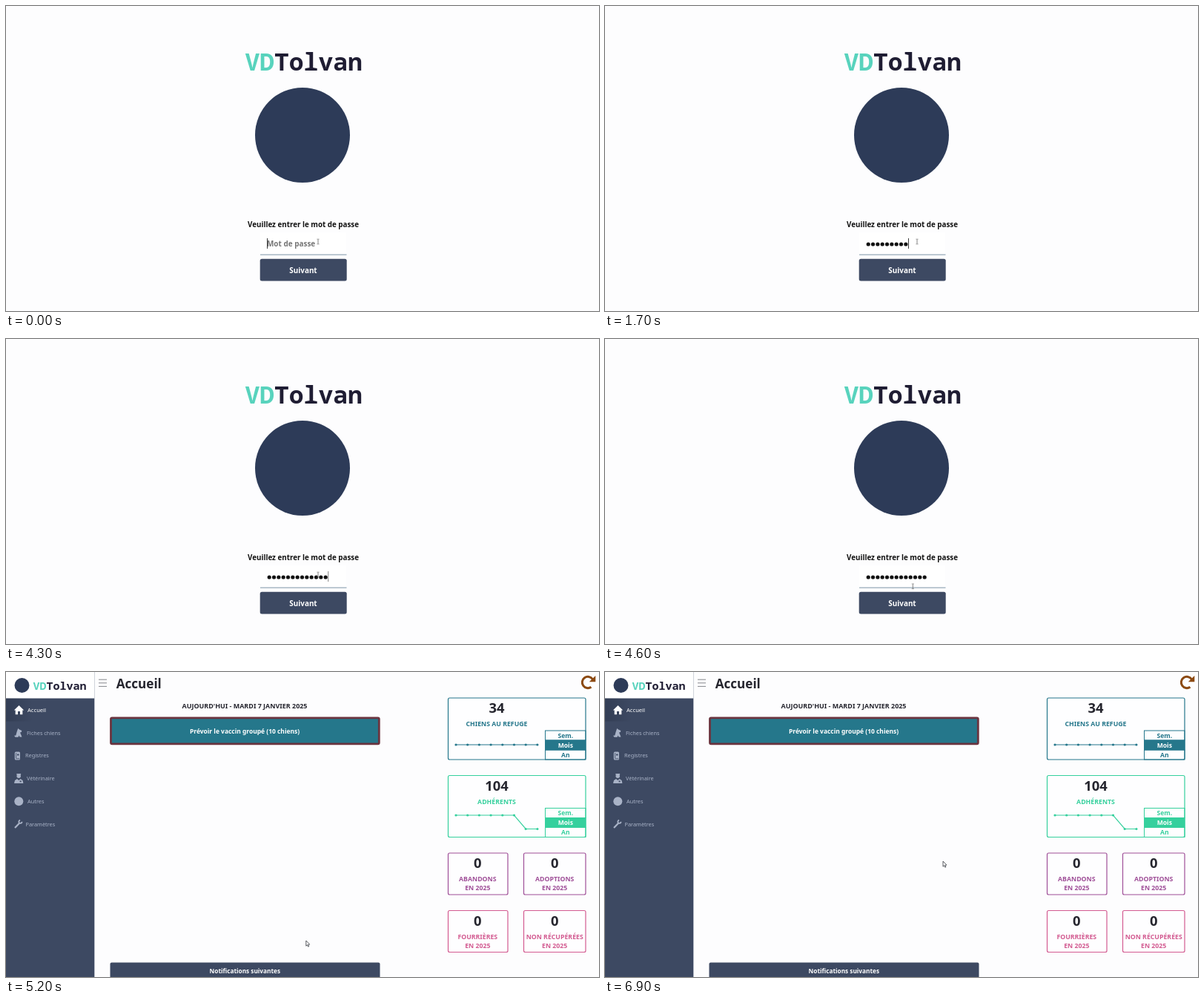
An HTML page with a canvas that plays this animation: 800 px wide and 411 px high, repeating every 7000 ms.

```html
<!DOCTYPE html>
<html lang="fr">
<head>
<meta charset="utf-8">
<title>Refuge</title>
<style>
html, body { margin: 0; width: 100%; height: 100%; overflow: hidden; background: #fdfdfe; }
canvas { display: block; width: 800px; height: 411px; }
</style>
</head>
<body>
<canvas id="stage"></canvas>
<script>
const W = 800, H = 411, LOOP = 7000;
const canvas = document.getElementById('stage');
const ctx = canvas.getContext('2d');
const ratio = window.devicePixelRatio || 1;
canvas.width = W * ratio;
canvas.height = H * ratio;

const SANS = '"Noto Sans", "Open Sans", sans-serif';
const MONO = '"Noto Sans Mono", "DejaVu Sans Mono", monospace';
const NAVY = '#3d4962', INK = '#25252e', PAPER = '#fdfdfe', LOGO = '#2d3b58';
const TEAL = '#25778b', GREEN = '#35d09d', PURPLE = '#9f4f98', PINK = '#d35b91';
const KEY_TIMES = [600, 700, 800, 900, 1000, 1200, 1400, 1600, 1700, 1900, 2100, 2300, 2500];

const clamp = v => Math.max(0, Math.min(1, v));
const progress = (t, from, to) => clamp((t - from) / (to - from));
const ease = p => p * p * (3 - 2 * p);
const lerp = (a, b, p) => a + (b - a) * p;

function text(str, x, y, size, color, align = 'center', weight = 'bold', family = SANS) {
  ctx.font = `${weight} ${size}px ${family}`;
  ctx.textAlign = align;
  ctx.fillStyle = color;
  ctx.fillText(str, x, y);
}

function rect(x, y, w, h, color) {
  ctx.fillStyle = color;
  ctx.fillRect(x, y, w, h);
}

function round(x, y, w, h, r) {
  ctx.beginPath();
  ctx.roundRect(x, y, w, h, r);
}

function disc(x, y, r, color) {
  ctx.fillStyle = color;
  ctx.beginPath();
  ctx.arc(x, y, r, 0, Math.PI * 2);
  ctx.fill();
}

function line(points, color, width) {
  ctx.strokeStyle = color;
  ctx.lineWidth = width;
  ctx.beginPath();
  points.forEach(([x, y]) => ctx.lineTo(x, y));
  ctx.stroke();
}

function poly(points, color) {
  ctx.fillStyle = color;
  ctx.beginPath();
  points.forEach(([x, y]) => ctx.lineTo(x, y));
  ctx.fill();
}

function brand(x, y, size) {
  text('VD', x, y, size, '#58d3bd', 'left', 'bold', MONO);
  const w = ctx.measureText('VD').width;
  text('Tolvan', x + w, y, size, '#1f1d33', 'left', 'bold', MONO);
}

function arrow(x, y) {
  ctx.beginPath();
  [[0, 0], [0, 7.2], [1.6, 5.8], [2.8, 8.2], [3.9, 7.7], [2.8, 5.3], [4.9, 5.1]]
    .forEach(([dx, dy]) => ctx.lineTo(x + dx, y + dy));
  ctx.closePath();
  ctx.fillStyle = '#fff';
  ctx.fill();
  ctx.strokeStyle = '#33363d';
  ctx.lineWidth = 0.8;
  ctx.stroke();
}

function ibeam(x, y) {
  line([[x, y - 3], [x, y + 3]], '#666', 0.8);
  for (const dy of [-3.3, 3.3]) line([[x - 1.6, y + dy], [x + 1.6, y + dy]], '#777', 0.7);
}

// Caret opacity: half-periods of about 530 ms with a short fade.
function caretAlpha(t) {
  if (t < 600) return t < 300 ? 1 : t < 400 ? 0.4 : 0;
  if (t < 3000) return 1;
  if (t < 3100) return 0.5;
  if (t < 3700) return 0;
  if (t < 4200) return 1;
  if (t < 4400) return 0.6;
  return t >= 4800 && t < 5000 ? 1 : 0;
}

function login(t) {
  brand(322.4, 87, 33);
  disc(400, 174, 64, LOGO);
  text('Veuillez entrer le mot de passe', 401, 297.5, 9.8, '#111');

  round(343, 305, 116, 30, 2);
  ctx.fillStyle = '#fff';
  ctx.fill();
  rect(343, 334.6, 116.5, 1, t < 5000 ? '#7d95a8' : '#55565c');

  const typed = KEY_TIMES.filter(k => t >= k).length;
  if (!typed) text('Mot de passe', 352, 324, 9.95, '#757575', 'left');
  for (let i = 0; i < typed; i++) disc(355.2 + 6.33 * i, 321, 2.6, '#111');

  ctx.globalAlpha = caretAlpha(t);
  rect(352 + 6.33 * typed, 313, 0.9, 14, '#222');
  ctx.globalAlpha = 1;

  const move = ease(progress(t, 4400, 4900));
  const x = lerp(421, 405, move), y = lerp(317.5, 362, move);
  const hover = progress(t, 4700, 4900);
  round(342.7, 340.8, 117, 29.8, 2.5);
  ctx.fillStyle = `rgb(${lerp(61, 77, hover)}, ${lerp(73, 91, hover)}, ${lerp(98, 115, hover)})`;
  ctx.fill();
  text('Suivant', 401, 360, 9.9, '#fff');

  if (y < 336) ibeam(x, y);
  else arrow(x, y);
}

const icons = [
  c => {
    poly([[10.8, 51.5], [17.5, 45], [24.2, 51.5], [22.3, 51.5], [22.3, 57.2], [19, 57.2],
      [19, 53], [16, 53], [16, 57.2], [12.7, 57.2], [12.7, 51.5]], c);
  },
  c => {
    poly([[16.2, 76], [18, 77.5], [21.3, 79], [20.8, 81], [19, 81.5], [21.5, 87.6], [18.5, 87.6],
      [17.5, 85.5], [16.5, 87.8], [12.5, 87.8], [11, 85.8], [13.3, 85.5], [14.5, 81]], c);
  },
  c => {
    round(11.8, 107.5, 7.2, 11, 1.5);
    ctx.fillStyle = c;
    ctx.fill();
    rect(13.3, 109, 0.8, 7, NAVY);
    rect(15, 110.5, 2.5, 2, NAVY);
    rect(13.3, 116.4, 5, 0.8, NAVY);
  },
  c => {
    disc(17.2, 140.2, 2.7, c);
    rect(14.3, 137, 5.8, 1.6, c);
    poly([[11, 150], [12, 146], [15, 144], [17.2, 146], [19.5, 144], [22.5, 146], [23.4, 150]], c);
    rect(18.6, 146.5, 2, 1.8, NAVY);
  },
  c => disc(17.3, 174.3, 6, c),
  c => {
    line([[12, 210], [18, 203.7]], c, 2.2);
    ctx.strokeStyle = c;
    ctx.lineWidth = 1.8;
    ctx.beginPath();
    ctx.arc(19.4, 201.8, 2.1, 0, Math.PI * 1.45);
    ctx.stroke();
  }
];

function sidebar() {
  rect(0, 0, 119, 36, '#fff');
  rect(0, 35.5, 119.5, H, NAVY);
  const shade = ctx.createLinearGradient(0, 0, 36, 0);
  shade.addColorStop(0, 'rgba(28, 36, 54, .3)');
  shade.addColorStop(1, 'rgba(28, 36, 54, 0)');
  rect(0, 35.5, 36, 31, shade);
  rect(119, 0, 0.8, H, '#c5c9d2');
  disc(21.5, 18, 10, LOGO);
  brand(36.4, 24, 15);

  const items = [['Accueil', 29], ['Fiches chiens', 28], ['Registres', 26],
    ['Vétérinaire', 28], ['Autres', 29], ['Paramètres', 26.5]];
  items.forEach(([label, x], i) => {
    const color = i ? '#a9b3c7' : '#fff';
    icons[i](color);
    text(label, x, 53.7 + 30.85 * i, i ? 7.35 : 7.6, color, 'left', 'normal');
  });
}

function card(x, y, w, h, color, number, cx, labels) {
  round(x, y, w, h, 2);
  ctx.fillStyle = '#fefeff';
  ctx.fill();
  ctx.strokeStyle = color;
  ctx.lineWidth = 1.2;
  ctx.stroke();
  text(number, cx, y + 20.2, 18.4, INK);
  labels.forEach((label, i) => text(label, cx, y + 38.2 + 12 * i, 8.75, color));
}

function chartCard(y, color, number, label, yOf) {
  card(596.5, y, 185.5, 83, color, number, 662, [label]);
  const points = Array.from({ length: 8 }, (_, i) => [607 + 15.7 * i, y + yOf(i)]);
  line(points, color, 1.2);
  points.forEach(([px, py]) => disc(px, py, 1.6, color));

  const top = y + 44;
  ['Sem.', 'Mois', 'An'].forEach((name, i) => {
    const by = top + 13 * i;
    const active = i === 1;
    if (active) rect(727.5, by, 54.5, 13, color);
    ctx.strokeStyle = color;
    ctx.lineWidth = 1;
    ctx.strokeRect(727.5, by, 54.5, 13);
    text(name, 754.8, by + 9.7, 8.6, active ? '#fff' : color);
  });
}

function refreshIcon() {
  const color = '#8c4a12';
  ctx.strokeStyle = color;
  ctx.lineWidth = 3;
  ctx.beginPath();
  ctx.arc(785, 14, 7.7, 0.95, Math.PI * 2 - 0.5);
  ctx.stroke();
  poly([[795.3, 5], [795.3, 13.2], [786.8, 13.2]], color);
}

function dashboard(t) {
  sidebar();
  for (const y of [10.2, 14.8, 19.4]) line([[125, y], [136, y]], '#85878c', 1);
  text('Accueil', 148.7, 22, 17.1, INK, 'left');
  refreshIcon();

  text("AUJOURD'HUI - MARDI 7 JANVIER 2025", 322, 49, 8.95, INK);
  round(141.5, 61.8, 361.8, 35, 1.5);
  ctx.fillStyle = TEAL;
  ctx.fill();
  ctx.strokeStyle = '#6b343f';
  ctx.lineWidth = 2.8;
  ctx.stroke();
  text('Prévoir le vaccin groupé (10 chiens)', 322, 83, 8.45, '#fff');

  round(140.5, 391.6, 364, 24, 2);
  ctx.fillStyle = NAVY;
  ctx.fill();
  text('Notifications suivantes', 322.3, 406.4, 8.25, '#fff');

  chartCard(35, TEAL, '34', 'CHIENS AU REFUGE', () => 63);
  chartCard(139.5, GREEN, '104', 'ADHÉRENTS', i => i < 6 ? 53.5 : 72);
  card(596.5, 244, 80.5, 56, PURPLE, '0', 636.3, ['ABANDONS', 'EN 2025']);
  card(698.5, 244, 83.5, 56, PURPLE, '0', 740.2, ['ADOPTIONS', 'EN 2025']);
  card(596.5, 321.5, 80.5, 56, PINK, '0', 636.3, ['FOURRIÈRES', 'EN 2025']);
  card(698.5, 321.5, 83.5, 56, PINK, '0', 740.2, ['NON RÉCUPÉRÉES', 'EN 2025']);

  const move = ease(progress(t, 5600, 6700));
  arrow(lerp(404.8, 456, move), lerp(362, 255, move));
}

function draw() {
  const t = performance.now() % LOOP;
  ctx.setTransform(ratio, 0, 0, ratio, 0, 0);
  ctx.globalAlpha = 1;
  rect(0, 0, W, H, PAPER);
  if (t < 5200) login(t);
  else dashboard(t);
  requestAnimationFrame(draw);
}
draw();
</script>
</body>
</html>
```
